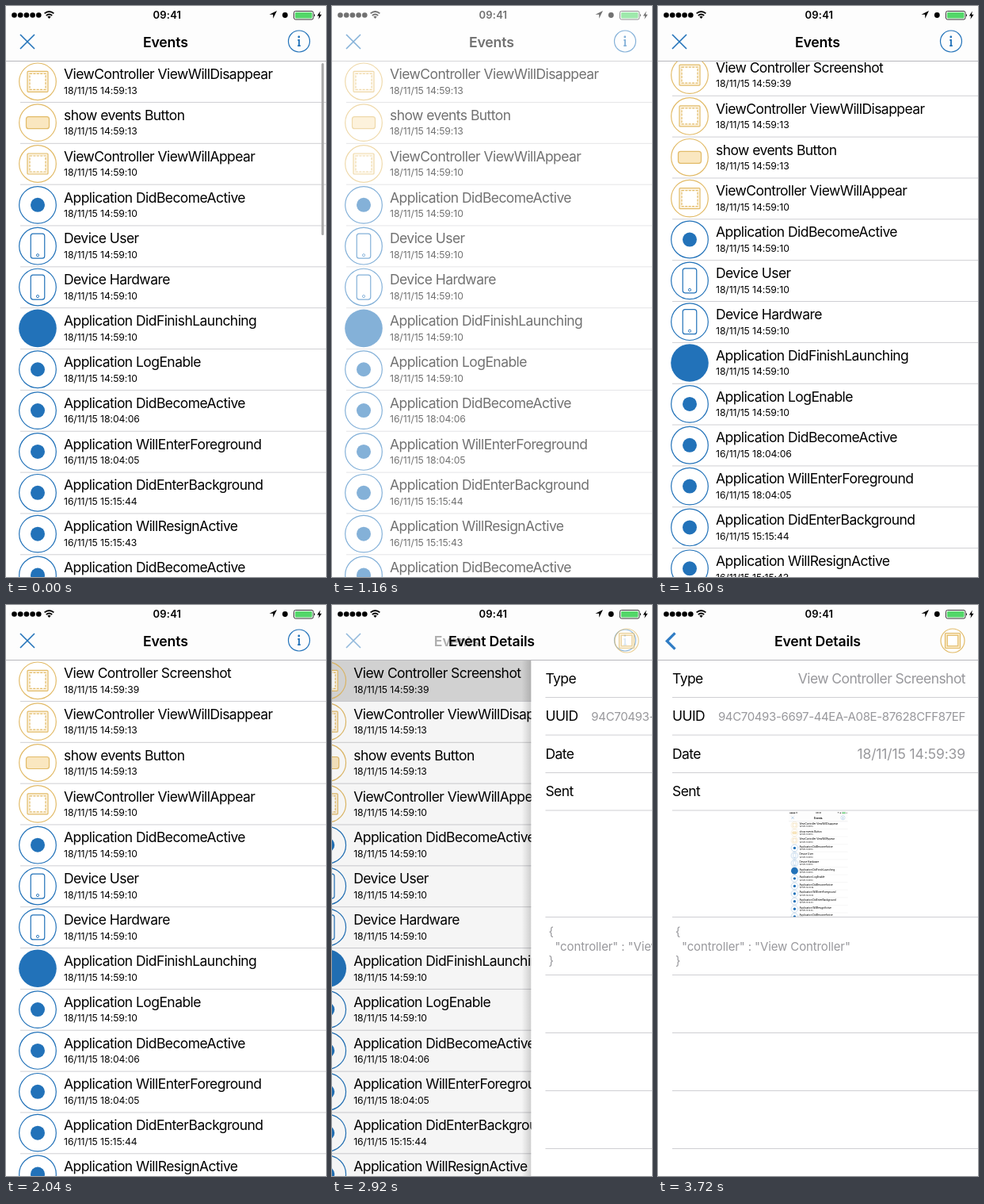
These frames come from a looping animation (404x720 px, 3760 ms). An HTML page:

```html
<!DOCTYPE html>
<html lang="en">
<head>
<meta charset="utf-8">
<title>Event log</title>
<style>
  html, body { margin: 0; height: 100%; overflow: hidden; background: #fff; }
  svg { display: block; }
  text { font: 17.5px Inter, "Liberation Sans", sans-serif; letter-spacing: -.56px; }
  .date { font-size: 12.2px; letter-spacing: -.08px; }
  .title { font-size: 17.7px; font-weight: 600; letter-spacing: -.2px; }
  .clock { font-size: 13px; font-weight: 600; letter-spacing: .2px; }
  .value { fill: #98989c; text-anchor: end; }
  .stamp { letter-spacing: -.12px; }
  .uuid { font-size: 15px; letter-spacing: -.36px; }
  .json { fill: #98989c; font-size: 15px; letter-spacing: -.12px; }
  .line { stroke: #cfcfd3; }
  .blue { stroke: #2272b9; fill: none; stroke-width: 1.2; }
  .gold { stroke: #e2bb68; fill: none; stroke-width: 1.2; }
</style>
</head>
<body>
<svg id="stage" width="404" height="720" viewBox="0 0 404 720"></svg>
<script>
const LOOP = 3760, STEP = 40, W = 404, TOP = 69.6, ROW = 51.85;

const events = [
  ['View Controller Screenshot', '18/11/15 14:59:39', 'view'],
  ['ViewController ViewWillDisappear', '18/11/15 14:59:13', 'view'],
  ['show events Button', '18/11/15 14:59:13', 'button'],
  ['ViewController ViewWillAppear', '18/11/15 14:59:10', 'view'],
  ['Application DidBecomeActive', '18/11/15 14:59:10', 'app'],
  ['Device User', '18/11/15 14:59:10', 'device'],
  ['Device Hardware', '18/11/15 14:59:10', 'device'],
  ['Application DidFinishLaunching', '18/11/15 14:59:10', 'launch'],
  ['Application LogEnable', '18/11/15 14:59:10', 'app'],
  ['Application DidBecomeActive', '16/11/15 18:04:06', 'app'],
  ['Application WillEnterForeground', '16/11/15 18:04:05', 'app'],
  ['Application DidEnterBackground', '16/11/15 15:15:44', 'app'],
  ['Application WillResignActive', '16/11/15 15:15:43', 'app'],
  ['Application DidBecomeActive', '16/11/15 15:15:40', 'app'],
];

const text = (x, y, s, cls = '') => `<text x="${x}" y="${y}" class="${cls}">${s}</text>`;
const line = y => `<path class="line" d="M18 ${y}H${W}"/>`;
const circle = (x, y, r, attrs = '') => `<circle cx="${x}" cy="${y}" r="${r}" ${attrs}/>`;
const box = (w, h, r = 0, attrs = '') =>
  `<rect x="${-w / 2}" y="${-h / 2}" width="${w}" height="${h}" rx="${r}" ${attrs}/>`;

const ring = cls => circle(0, 0, 23.3, `class="${cls}"`);
const icons = {
  view: ring('gold') + box(26, 26, 1, 'class="gold" style="fill:#fdf4e3"') +
    box(20, 20, 0, 'class="gold" style="fill:#fff" stroke-dasharray="3 1.4"'),
  button: ring('gold') + box(29, 15, 3, 'class="gold" style="fill:#fae7c0"'),
  device: ring('blue') + box(17.5, 31, 3, 'class="blue"') + circle(0, 11.5, 1.6, 'class="blue" style="stroke-width:.9"'),
  app: ring('blue') + circle(0, 0, 9, 'fill="#2272b9"'),
  launch: circle(0, 0, 23.8, 'fill="#2272b9"'),
};

const rows = list => list.map(([name, date, icon], i) =>
  `<g transform="translate(0 ${TOP + i * ROW})">
    <g transform="translate(40 25.7)">${icons[icon]}</g>
    ${text(73, 22.4, name)}${text(73, 41, date, 'date')}${line(ROW)}
  </g>`).join('');

const status = [0, 1, 2, 3, 4].map(i => circle(10.5 + 7.7 * i, 11.5, 3.3)).join('') +
  `<path d="M48.6 9.4Q54.5 4.6 60.4 9.4M50.8 12Q54.5 9 58.2 12" fill="none" stroke="#000" stroke-width="1.8"/>
   <path d="M52.3 13.5Q54.5 12 56.7 13.5L54.5 16Z"/>` +
  text(185.5, 16.2, '09:41', 'clock') +
  `<path d="M342 6L332.5 10.8H337.2V15.8Z"/>` + circle(352.3, 11.5, 3.4) +
  `<rect x="363.5" y="6.5" width="24.5" height="10.5" rx="2" fill="none" stroke="#333"/>
   <rect x="365" y="8" width="21.5" height="7.5" rx="1" fill="#53d769"/>
   <path d="M389 10Q391 11.7 389 13.5Z"/>
   <path d="M396.8 6.5L392.8 12.4H395.3L394.4 16.8L398.6 10.8H396Z"/>`;

const bar = `<rect width="${W}" height="${TOP}" fill="#fdfdfd"/><path d="M0 69.5H${W}" stroke="#b8b8bc"/>`;
const cross = '<path class="blue" style="stroke-width:1.6" d="M18 36L36 54M36 36L18 54"/>';
const info = circle(370, 44.5, 13.5, 'class="blue"') + circle(369.8, 39, 1.4, 'fill="#2272b9"') +
  '<path class="blue" style="stroke-width:1.8" d="M368.4 43H370V50.2M368.2 50.2H371.8"/>';
const listTitle = text(173, 52, 'Events', 'title');

const thumbnail = `<svg x="165" y="260" width="74.8" height="133.3" viewBox="0 0 404 720">
  ${rows(events.slice(1))}${bar}${cross}${info}${listTitle}${status}</svg>`;

const details = [116.5, 164, 211.5, 259, 393.5, 466.5, 539.5, 612.5, 685.5].map(line).join('') +
  ['Type', 'UUID', 'Date', 'Sent'].map((s, i) => text(18, 98.7 + 47.5 * i, s)).join('') +
  text(388, 98.7, 'View Controller Screenshot', 'value') +
  text(388, 146, '94C70493-6697-44EA-A08E-87628CFF87EF', 'value uuid') +
  text(388, 193.7, '18/11/15 14:59:39', 'value stamp') + thumbnail +
  text(22, 417, '{', 'json') + text(30, 435.8, '"controller" : "View Controller"', 'json') + text(22, 453.5, '}', 'json');

stage.innerHTML = `
  <defs><linearGradient id="edge">
    <stop stop-opacity="0"/><stop offset="1" stop-opacity=".16"/>
  </linearGradient></defs>
  <g id="list">
    <g id="table">
      <rect id="highlight" y="${TOP}" width="${W}" height="${ROW}" fill="#d9d9d9"/>
      ${rows(events)}
    </g>
    <rect id="scroller" x="398.3" y="72" width="3" height="217" rx="1.5" fill="#a8a8a8"/>
    <rect id="dim" y="69" width="${W}" height="651"/>
  </g>
  <g id="page">
    <rect x="-12" y="69" width="12" height="651" fill="url(#edge)"/>
    <rect y="69" width="${W}" height="651" fill="#fff"/>${details}
  </g>
  ${bar}
  <g id="oldTitle">${listTitle}</g>
  <g id="oldButtons">${cross}${info}</g>
  <g id="newTitle">${text(147, 52, 'Event Details', 'title')}</g>
  <g id="newIcon" class="gold">${circle(372, 45, 15)}
    <g transform="translate(372 45)">${box(19, 19, 1, 'style="fill:#fbeccb"')}
    ${box(13.5, 13.5, 0, 'style="fill:#fff"')}</g></g>
  <path id="back" d="M21.5 35.3L11.3 45.5L21.5 55.7" fill="none" stroke="#2f7cc4" stroke-width="3.2"/>
  ${status}
  <rect id="flash" width="${W}" height="720" fill="#fefefe"/>`;

const clamp = v => Math.min(1, Math.max(0, v));
const ramp = (t, from, to) => clamp((t - from) / (to - from));
const move = (el, x, y = 0) => el.setAttribute('transform', `translate(${x} ${y})`);
const fade = (el, a) => el.setAttribute('opacity', clamp(a));

// Critically damped spring from 0 to 1
const spring = (t, rate) => t <= 0 ? 0 : 1 - (1 + rate * t) * Math.exp(-rate * t);

function draw(t) {
  const insert = (1 - Math.cos(Math.PI * ramp(t, 1378, 1678))) / 2;
  const push = spring(t - 2845, 0.0175);
  const rest = 1 - push;

  fade(scroller, 1 - ramp(t, 200, 450));
  fade(flash, t < 720 ? 0 : 1 - ramp(t, 760, 1480));
  move(table, 0, (insert - 1) * ROW);
  fade(highlight, t >= 2760 ? 1 : 0);

  move(list, -0.3 * W * push);
  fade(dim, 0.1 * push);
  move(page, push ? W * rest : W + 20);

  move(oldTitle, -142 * push ** 1.2);
  fade(oldTitle, rest ** 2.5);
  fade(oldButtons, rest ** 1.5);
  fade(newTitle, 3 * push);
  fade(newIcon, 1.8 * push);
  fade(back, 2 * push - 1);
}

const start = performance.now();
function tick() {
  const t = (performance.now() - start) % LOOP;
  draw(Math.floor(t / STEP) * STEP);
  requestAnimationFrame(tick);
}
tick();
</script>
</body>
</html>
```
